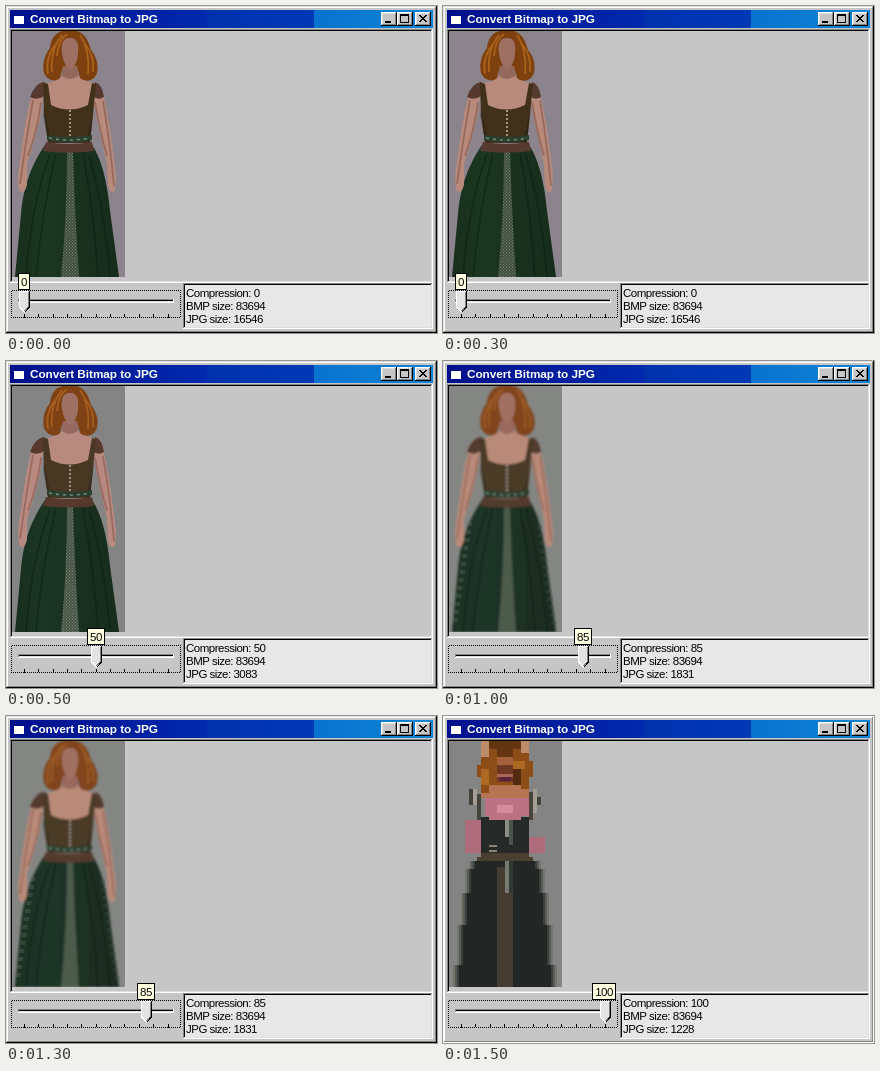
An HTML page for the animation above (2 s loop, 431 by 327 pixels).

```html
<!DOCTYPE html>
<html lang="en">
<head>
<meta charset="utf-8">
<title>Convert Bitmap to JPG</title>
<style>
  html, body { margin: 0; width: 100%; height: 100%; overflow: hidden; background: #c6c6c6; }
  svg { display: block; width: 431px; height: 327px; }
  text { font: 11.5px "Liberation Sans", Arial, sans-serif; letter-spacing: -.5px; white-space: pre; }
  .title { font-weight: bold; font-size: 11.8px; letter-spacing: -.06px; fill: #fff; }
  .crisp { shape-rendering: crispEdges; }
</style>
</head>
<body>
<svg id="stage" viewBox="0 0 431 327">
  <defs>
    <linearGradient id="bar">
      <stop offset="0" stop-color="#00108c"/>
      <stop offset=".465" stop-color="#0029ad"/>
      <stop offset=".466" stop-color="#0031ad"/>
      <stop offset=".718" stop-color="#0039b5"/>
      <stop offset=".719" stop-color="#0873ce"/>
      <stop offset="1" stop-color="#1084d6"/>
    </linearGradient>
    <linearGradient id="fold">
      <stop offset="0" stop-color="#000" stop-opacity=".12"/>
      <stop offset=".3" stop-color="#000" stop-opacity="0"/>
      <stop offset="1" stop-color="#000" stop-opacity=".18"/>
    </linearGradient>
    <pattern id="dots" width="2" height="2" patternUnits="userSpaceOnUse">
      <path d="M0 0H1V1H0ZM1 1H2V2H1Z"/>
    </pattern>
    <pattern id="lace" width="3" height="3" patternUnits="userSpaceOnUse">
      <path d="M0 0H1V1H0ZM1.5 1.5H2.5V2.5H1.5Z" fill="#94a08f" opacity=".6"/>
    </pattern>
    <clipPath id="photo"><rect x="6" y="25" width="113" height="246"/></clipPath>
    <filter id="soft"><feGaussianBlur stdDeviation=".5"/></filter>
    <filter id="softer"><feGaussianBlur stdDeviation=".85"/></filter>
  </defs>
  <g id="chrome" class="crisp"></g>
  <g id="states"></g>
</svg>
<script>
const PERIOD = 500;
const steps = [
  { level: 0, size: 16546, tip: 12, art: { bg: '#8c848c', skin: '#b88a7b', dark: '#80564b', hair: '#7d400e', glow: '#c27424', top: '#42311a', sleeve: '#56392f', skirt: '#1b3621', lace: '#3f4f3e', filter: 'soft' } },
  { level: 50, size: 3083, tip: 81, art: { bg: '#848484', skin: '#b88a7f', dark: '#845850', hair: '#7f4214', glow: '#ba6e25', top: '#483823', sleeve: '#56392c', skirt: '#1b3523', lace: '#465546', filter: 'soft' } },
  { level: 85, size: 1831, tip: 131, art: { bg: '#848684', skin: '#b98a78', dark: '#87584e', hair: '#80451a', glow: '#af692b', top: '#4a3a28', sleeve: '#533b2f', skirt: '#1f3527', lace: '#4c5b4b', filter: 'softer', coarse: true } },
  { level: 100, size: 1228, tip: 149, edge: '#fff' }
];

const rect = (x, y, w, h, fill, more = '') =>
  `<rect x="${x}" y="${y}" width="${w}" height="${h}" fill="${fill}" ${more}/>`;
const path = (d, fill, more = '') => `<path d="${d}" fill="${fill}" ${more}/>`;
const line = (d, color, width = 1, more = '') =>
  `<path d="${d}" fill="none" stroke="${color}" stroke-width="${width}" ${more}/>`;
const text = (x, y, s, more = '') => `<text x="${x}" y="${y}" ${more}>${s}</text>`;

// One-pixel frame: light from the top left when raised.
function bevel(x, y, w, h, light, dark) {
  return rect(x, y, w, 1, light) + rect(x, y, 1, h, light) +
    rect(x, y + h - 1, w, 1, dark) + rect(x + w - 1, y, 1, h, dark);
}

function button(x, glyph) {
  return rect(x, 6, 16, 14, '#c6c6c6') + bevel(x, 6, 16, 14, '#fff', '#000') +
    bevel(x + 1, 7, 14, 12, '#dedede', '#848484') +
    `<g transform="translate(${x} 6)">${glyph}</g>`;
}

function cross() {
  let s = '';
  for (let i = 0; i < 7; i++) s += rect(4 + i, 3 + i, 2, 1, '#000') + rect(10 - i, 3 + i, 2, 1, '#000');
  return s;
}

function chrome() {
  let s = rect(0, 0, 431, 327, '#c6c6c6') +
    bevel(0, 0, 431, 327, '#dedede', '#000') + bevel(1, 1, 429, 325, '#fff', '#848484') +
    rect(4, 4, 423, 18, 'url(#bar)') + rect(8, 10, 10, 8, '#fff') +
    text(24, 17, 'Convert Bitmap to JPG', 'class="title"') +
    button(375, rect(4, 9, 6, 2, '#000')) +
    button(391, rect(3, 2, 9, 2, '#000') + bevel(3, 3, 9, 8, '#000', '#000')) +
    button(409, cross()) +
    bevel(4, 23, 423, 254, '#848484', '#fff') + bevel(5, 24, 421, 252, '#000', '#dedede') +
    rect(177, 277, 250, 46, '#e7e7e7') + bevel(177, 277, 250, 46, '#848484', '#fff') +
    bevel(178, 278, 248, 44, '#000', '#dedede') +
    bevel(5, 284, 170, 28, 'url(#dots)', 'url(#dots)') +
    bevel(12, 293, 156, 4, '#848484', '#fff') + rect(13, 294, 154, 1, '#000') + rect(13, 295, 154, 1, '#dedede');
  for (let i = 0; i <= 10; i++) s += rect(Math.round(18 + i * 14.35), 308, 1, i % 10 ? 3 : 4, '#000');
  return s;
}

function figure(c) {
  const skirt = 'M39 139Q63 145 86 139C95 152 101 174 104 205L113 271H9L15 208C18 176 28 155 39 139Z';
  const panel = 'M61 144H67Q69 213 73 271H55Q61 212 61 144Z';
  let s = rect(6, 25, 113, 246, c.bg) + `<g filter="url(#${c.filter})">` +
    // neck and shoulders
    path('M57 57H71L72 70Q80 76 91 78L85 104H42L36 78Q52 76 56 70Z', c.skin) +
    path('M56 57H72V70Q64 76 56 70Z', c.dark, 'opacity=".65"') +
    // skirt
    path(skirt, c.skirt) + path(skirt, 'url(#fold)') +
    line('M50 147Q36 205 30 271M44 148Q25 200 20 271M77 147Q88 207 92 271M83 149Q99 205 104 271', '#0a2014', 1.5, 'opacity=".6"') +
    path(panel, c.lace) + (c.coarse ? '' : path(panel, 'url(#lace)')) +
    // arms and hands
    path('M26 88L37 89C35 115 28 136 21 158L21 179Q18 190 13 184L12 170C16 143 19 112 26 88Z', c.skin) +
    path('M87 89L97 88C103 112 107 144 110 170L109 184Q105 190 102 180L101 158C96 135 91 118 87 89Z', c.skin) +
    line('M27 94Q20 134 14 178M35 96Q32 122 22 150M89 96Q94 126 101 150M97 95Q104 136 108 180', c.dark, 1.8, 'opacity=".6"') +
    // sleeves and bodice
    path('M38 76Q29 77 24 91Q31 95 38 90ZM89 76Q96 78 98 91Q92 95 87 90Z', c.sleeve) +
    path('M37 76L42 78L45 99Q63 108 82 99L86 77L90 78L87 108L84 137H42L38 108Z', c.top) +
    path('M38 102L45 136H42L37 110ZM88 102L80 136H84L87 110Z', '#000', 'opacity=".22"') +
    line('M64 104V130', '#9c9488', 2, 'stroke-dasharray="2 2"') +
    path('M40 136Q63 140 86 136L88 145Q64 148 37 145Z', c.sleeve) +
    path('M41 129Q63 133 86 129V134Q64 138 41 134Z', '#29402f') +
    line('M43 132Q64 136 85 132', '#71887a', 1.6, 'stroke-dasharray="3 4"') +
    // long hair and face
    path('M64 24C50 24 45 32 44 42C38 49 36 59 38 67C41 74 49 77 54 72L57 60H71L74 72C80 77 88 75 91 67C93 58 90 50 85 44C82 31 76 24 64 24Z', c.hair) +
    line('M56 29Q44 44 46 66M50 38Q39 51 42 68M74 29Q84 44 82 68M79 38Q89 50 87 66M61 28Q52 34 51 50', c.glow, 1.8, 'opacity=".65"') +
    path('M64 32C57 32 55 38 56 47Q58 60 64 64Q71 60 72 47C73 38 71 32 64 32Z', c.skin) +
    path('M64 32C57 32 55 38 56 47Q58 60 64 64Q71 60 72 47C73 38 71 32 64 32Z', c.dark, 'opacity=".5"') + '</g>';
  if (c.coarse) {
    // block noise beside the skirt
    for (let i = 0; i < 13; i++) {
      const y = 161 + i * 8, half = 36 + i * 1.2;
      s += rect(60 - half, y, 5, 4, '#68716a', 'opacity=".35"') +
        rect(58 + half, y + 3, 5, 4, '#414d46', 'opacity=".35"');
    }
  }
  return s;
}

function blocks() {
  let s = rect(6, 25, 113, 246, '#848484');
  // stepped skirt with a fringe fading to grey
  for (let y = 145; y < 271; y += 8) {
    const half = 28 + Math.round(Math.sqrt((y - 137) / 134) * 5) * 4;
    ['#74756f', '#575a55', '#3c403c', '#222725'].forEach((color, i) => {
      const w = half + 4 - i * 2;
      s += rect(62 - w, y, 2 * w, 8, color);
    });
  }
  s += path('M54 151H70V271H54Z', '#453d31') +
    path('M62 145H66V177H62Z', '#777a70') +
    path('M66 145H70V177H66Z', '#303932') +
    // arms and shoulders
    path('M22 104H38V137H22ZM86 121H102V137H86Z', '#ad6b7c') +
    path('M26 73H30V89H26ZM34 78H38V104H34ZM94 81H98V89H94Z', '#42423b') +
    path('M30 73H34V89H30ZM90 73H94V97H90Z', '#a59c94') +
    path('M86 76H90V104H86Z', '#4a423b') +
    // bodice
    path('M38 101H86V137H38Z', '#252a28') +
    path('M62 104H66V121H62Z', '#8a8c84') + path('M66 104H70V129H66Z', '#48544a') +
    path('M46 129H54V131H46ZM46 134H54V136H46Z', '#8c8471') +
    path('M38 137H86V141H90V145H34V141H38Z', '#4a4031') +
    // chest
    path('M38 69H86V82H38Z', '#b57552') +
    path('M42 82H86V100H78V104H46V100H42Z', '#bd7184') +
    path('M54 89H70V97H54Z', '#d68c9c') +
    // hair and head
    path('M38 25H46V41H38ZM78 25H86V41H78Z', '#bd8c6b') +
    path('M46 25H78V37H86V45H90V61H86V73H78V69H46V77H38V61H34V49H38V41H46Z', '#8c4d16') +
    path('M46 25H78V33H70V41H54V33H46Z', '#633510') +
    path('M38 53H46V69H38ZM70 45H82V53H70Z', '#ad6821') +
    path('M54 41H70V49H54Z', '#a55f39') + path('M54 49H70V66H54Z', '#6f3825') +
    path('M54 58H70V61H54Z', '#aa6755') + path('M57 61H68V65H57Z', '#59243b') +
    path('M70 53H78V69H70Z', '#522b10');
  return s;
}

function thumb(x) {
  return path(`M${x - 5} 285H${x + 6}V301L${x + .5} 307L${x - 5} 301Z`, '#e3e3e3') +
    line(`M${x - 4.5} 301V285.5H${x + 5}`, '#fff') +
    line(`M${x - 4.5} 301L${x + .5} 306`, '#fff') +
    line(`M${x + 4.5} 286V301L${x + .5} 305`, '#848484') +
    line(`M${x + 5.5} 285V301L${x + .5} 306.5`, '#000');
}

function tooltip(x, label) {
  const w = label.length * 6 + 6;
  return rect(x, 267, w, 17, '#ffffe1') + bevel(x, 267, w, 17, '#000', '#000') +
    text(x + w / 2, 280, label, 'text-anchor="middle"');
}

function state({ level, size, tip, art, edge }) {
  const lines = [`Compression: ${level}`, 'BMP size: 83694', `JPG size: ${size}`];
  return `<g visibility="hidden"><g clip-path="url(#photo)" ${art ? '' : 'class="crisp"'}>` +
    (art ? figure(art) : blocks()) + '</g><g class="crisp">' +
    (edge ? bevel(0, 0, 431, 327, edge, edge) : '') +
    thumb(Math.round(18 + level * 1.435)) + tooltip(tip, String(level)) + '</g>' +
    lines.map((s, i) => text(180, 291 + i * 13, s)).join('') + '</g>';
}

document.getElementById('chrome').innerHTML = chrome();
const holder = document.getElementById('states');
holder.innerHTML = steps.map(state).join('');
const groups = [...holder.children];

function tick() {
  const now = Math.floor(performance.now() / PERIOD) % steps.length;
  groups.forEach((g, i) => g.setAttribute('visibility', i === now ? 'visible' : 'hidden'));
  requestAnimationFrame(tick);
}
tick();
</script>
</body>
</html>
```
